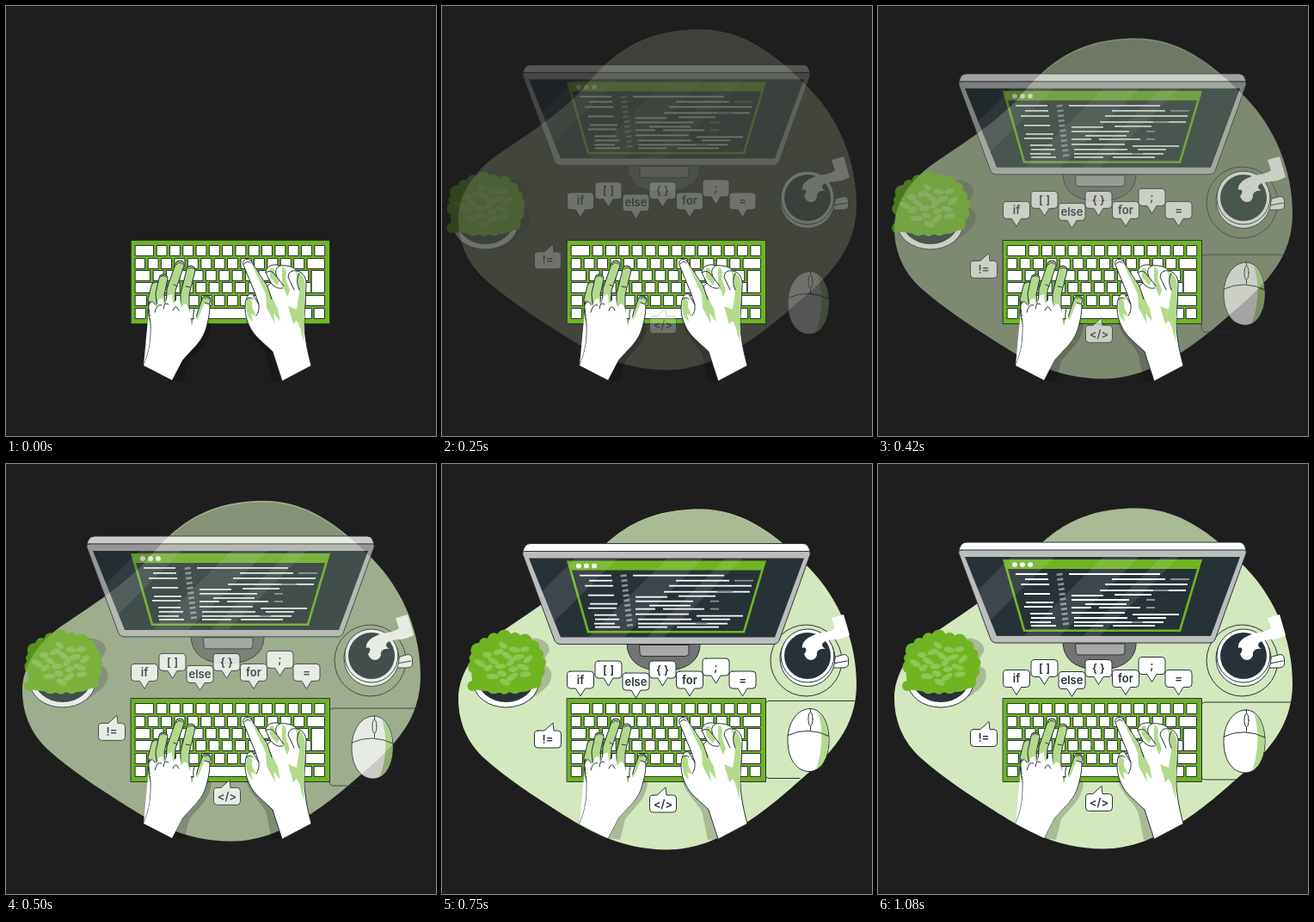
These frames come from a looping animation (500x500 px, 1120 ms). An HTML page:

```html
<!DOCTYPE html>
<html lang="en">
<head>
<meta charset="utf-8">
<title>Coding desk</title>
<style>
  html, body { margin: 0; width: 100%; height: 100%; overflow: hidden; background: #1e1e1e; }
  svg { display: block; width: 100%; height: 100%; }
  text { font: 600 13px Inter, "Open Sans", sans-serif; text-anchor: middle; fill: #263238; }
  .ink { stroke: #263238; stroke-width: 1; stroke-linejoin: round; stroke-linecap: round; }
  .line { fill: none; }
  .white { fill: #fff; }
  .green { fill: #6fb522; }
  .pale { fill: #b3da8b; }
  .shade { fill: #000; opacity: .2; }
  .finger { fill: none; stroke-linecap: round; stroke-linejoin: round; }
</style>
</head>
<body>
<svg viewBox="0 0 500 500">
  <defs>
    <path id="blobShape" d="M19 272C19 245 36 218 62 199C95 176 130 155 160 125C190 90 222 51.500 300 51.500C348 51.500 386 78 427 120C462 156 482 205 482 255C482 306 452 336 416 367C382 397 325 447.500 262 447.500C205 447.500 165 422 135 403C105 384 75 364 50 342C28 322 19 297 19 272Z"/>
    <clipPath id="blobClip"><use href="#blobShape"/></clipPath>
    <clipPath id="screenClip"><path d="M101 108H421L387 200H138Z"/></clipPath>
  </defs>

  <g id="blob"><use href="#blobShape" fill="#d3e8bd"/></g>

  <g id="plant">
    <path class="shade" d="M98 203C112 201 125 207 123 218C119 226 114 230 117 234C128 237 128 250 121 258C114 266 107 269 100 276Z"/>
    <ellipse class="white ink" cx="73" cy="254" rx="38" ry="29"/>
    <ellipse cx="73" cy="250" rx="33" ry="27" fill="#263238"/>
    <g id="foliage"></g>
  </g>

  <g id="mouse">
    <path class="ink line" d="M480 277H381Q376 277 376 282V362Q376 367 381 367H416"/>
    <path class="white ink" d="M428 286C442 286 450 303 450 323C450 344 440 359 427 359C412 359 402 344 402 323C402 302 413 286 428 286Z"/>
    <path class="pale" d="M437 290C446 297 449.500 310 449.500 323C449.500 339 443 352 435 356C442 338 444 310 437 290Z"/>
    <path class="ink line" d="M402 317Q426 306 450 318M428.500 286V311"/>
    <ellipse class="white ink" cx="428.500" cy="298" rx="2.500" ry="8"/>
  </g>

  <g id="mug">
    <circle class="ink line" cx="423.500" cy="228.500" r="41.500"/>
    <path class="white ink" d="M452 226L465 222Q472 220 472.500 227V233Q472 237 465 237H450Z"/>
    <path class="ink line" d="M455 232L471 229"/>
    <ellipse class="white ink" cx="425" cy="226" rx="32" ry="32.500"/>
    <circle class="white ink" cx="425" cy="223" r="31"/>
    <circle cx="425" cy="223" r="27" fill="#263238"/>
    <path class="white" d="M467 175C462 176 458 178 453 179L457 191C450 197 438 195 430 200C423 203 418 208 419 214C424 212 425 217 421 221C424 230 434 230 436 222C435 217 440 214 446 215C439 211 442 207 449 205C459 204 467 203 474 199Z"/>
  </g>

  <g id="monitor">
    <path class="shade" clip-path="url(#blobClip)" d="M120 40H460V98H120Z"/>
    <path d="M215 206H300C301 228 283 239 257 239C232 239 215 229 215 206Z" fill="#737373" class="ink"/>
    <path d="M230 209H287V218Q287 222 283 222H234Q230 222 230 218Z" fill="#a8a8a8" class="ink"/>
    <path class="white ink" d="M94 102Q95 91 103 91H420Q427 91 428 102Z"/>
    <path d="M97 100H425Q429 100 428 104L392 204Q390 208 386 208H137Q133 208 131 204L94 104Q93 100 97 100Z" fill="#bdbdbd" class="ink"/>
    <path d="M101 108H421L387 200H138Z" fill="#263238"/>
    <path class="green" d="M145 111H377L352 195H169Z"/>
    <path d="M151 122H371L350 192.500H171Z" fill="#263238"/>
    <g class="white">
      <ellipse cx="159" cy="117" rx="3" ry="2.800"/>
      <ellipse cx="168" cy="117" rx="3" ry="2.800"/>
      <ellipse cx="177" cy="117" rx="3" ry="2.800"/>
    </g>
    <path fill="none" stroke="#fff" stroke-width="1.800" d="M160 128H197M171 134H198M166 140H199M170 151H200M172 161H204M170 166H203M177 174H203M178 179H206M177 184H201M178 188H207M222 128H328M272 134H334M264 140H360M258 147H358M225 153H262M275 152H318M225 158H292M241 163H289M225 167H248M257 167H305M225 173H287M296 175H350M228 179H290M302 179H335M228 184H332M228 188H262M273 188H322"/>
    <path fill="none" stroke="#8b9295" stroke-width="1.800" d="M340 134H362M320 147H338M312 158H322M312 167H322M295 184H308"/>
    <path fill="none" stroke="#8b9295" stroke-width="7" stroke-dasharray="2.600 3.200" d="M211 127L219 190"/>
    <g clip-path="url(#screenClip)" fill="#fff" opacity=".1">
      <path d="M155 108H205L122 190L101 162Z"/>
      <path d="M262 108H304L212 200H170Z"/>
      <path d="M330 108H350L258 200H238Z"/>
    </g>
  </g>

  <g id="keyboard">
    <rect class="green ink" x="145.500" y="272.500" width="231" height="97"/>
  </g>

  <g id="hands">
    <path class="shade" d="M193 435L207 437L213 413C224 399 237 391 239 371L233 365L205 411Z"/>
    <path class="shade" d="M278 366C285 388 300 395 303 407L309 437L321 436L310 402L283 371Z"/>
    <g id="fingers"></g>
    <path class="white ink" d="M160 418C167 402 169 388 168 368C165 357 165 349 167 343M231 345L237 347C237 358 235 368 231 379C226 392 213 402 205 412L193 435"/>
    <path class="white" d="M160 418C167 402 169 388 168.500 368L166.500 350C169 341 173 341 174 351L178 341L182 340L184 349L188 337L193 335L194 347C199 338 203 338 204 351C208 343 212 346 214 358L216 371L220 355L222 364L226 369L232 357C234 364 233 374 230.500 379C226 392 213 402 205 412L193 435Z"/>
    <path class="ink line" d="M166 347Q170 340 173 347M173 356Q176 345 181 348M183 352Q184 343 189 347M194 354Q197 345 201 354M198 301Q201 296 205 300M212 306Q216 302 219 306M180 315Q183 312 186 315M231 340Q235 337 237 341M219 352Q217 359 218 364M195 324L199 326M209 326L214 327"/>
    <path class="white ink" d="M321 436L310 402C300 392 288 384 283 372C278 362 277 350 279 342C281 334 286 333 288 337L294 347L290 335L276 301C274 295 281 292 285 297L304 326L308 322L302 310C302 302 312 299 318 302C326 301 335 303 338 308C345 309 350 316 349 326L347 360C346 380 350 400 355 418Z"/>
    <path class="pale" d="M285 299L304 327L311 342L316 352L319 367L311 357L313 370L303 351L302 335ZM280 341C284 336 287 343 286 350L291 361L285 358L287 367C280 363 278 350 280 341ZM307 305C311 303 314 307 312 311L318 319L315 325L307 315ZM321 304C326 304 327 310 325 317L330 331L327 338L321 323ZM337 309C345 311 348 317 348 328L346 390C343 378 341 370 338 366L334 370L328 349L338 353L341 333Z"/>
    <path class="ink line" d="M304 326L309 341M308 322Q314 330 322 328M302 310Q309 305 314 314M318 302Q311 306 315 315L323 326M338 308Q329 306 328 315L335 330M341 311Q336 319 341 330M277 300Q281 295 284 299M280 341Q284 337 287 341M294 347Q295 355 291 360"/>
  </g>

  <g id="bubbles"></g>
</svg>

<script>
const LOOP = 1120;
const FPS = 24;
const byId = id => document.getElementById(id);

function add(parent, tag, attrs, text) {
  const node = document.createElementNS("http://www.w3.org/2000/svg", tag);
  for (const key in attrs) node.setAttribute(key, attrs[key]);
  if (text) node.textContent = text;
  return parent.appendChild(node);
}

function key(x, y, width, height = 12) {
  add(byId("keyboard"), "rect", { class: "white ink", x: x + .5, y: y + .5, width: width - 1, height });
}

// A run of equal keys between two wider ones.
function keyRow(y, firstWidth, count, lastX) {
  const start = 150 + firstWidth + 3;
  const pitch = (lastX - start) / count;
  key(150, y, firstWidth);
  for (let i = 0; i < count; i++) key(start + i * pitch, y, pitch - 2.8);
  if (lastX < 371) key(lastX, y, 371 - lastX);
}

function buildKeyboard() {
  keyRow(278, 22, 13, 374);
  keyRow(293, 12, 12, 350);
  keyRow(307, 18, 12, 355);
  keyRow(321, 22, 12, 358);
  keyRow(336, 14, 12, 348);
  key(355, 307, 16, 26);
  for (const x of [150, 165, 181, 196, 212, 297, 312, 328, 343, 358]) key(x, 351, 13);
  key(228, 351, 56);
}

function buildFingers() {
  const fingers = [
    "M172 358L170 342L174 326",
    "M181 352L179 335L183 317",
    "M191 352L192 330L202 301",
    "M208 360L208 335L215 307",
    "M224 371L228 356L233 342"
  ];
  for (const d of fingers) {
    add(byId("fingers"), "path", { class: "finger", d, stroke: "#263238", "stroke-width": 11 });
    add(byId("fingers"), "path", { class: "finger", d, stroke: "#b3da8b", "stroke-width": 9 });
  }
}

function buildFoliage() {
  const leaves = byId("foliage");
  add(leaves, "path", { class: "green", d: "M34 224L65 198L107 208L116 235L113 259L92 265L65 266L33 262Z" });
  const edge = 19;
  for (let i = 0; i < edge; i++) {
    const angle = i / edge * 2 * Math.PI;
    add(leaves, "circle", {
      class: "green",
      cx: 74 + 38 * Math.cos(angle),
      cy: 231 + 30 * Math.sin(angle),
      r: 7.5 + 1.3 * Math.sin(i * 2.4)
    });
  }
  add(leaves, "circle", { class: "green", cx: 34, cy: 258, r: 6 });
  for (let i = 0; i < 20; i++) {
    const angle = i * 2.4, radius = Math.sqrt((i + .5) / 20);
    const x = 73 + 32 * radius * Math.cos(angle), y = 231 + 23 * radius * Math.sin(angle);
    add(leaves, "ellipse", {
      cx: x, cy: y, rx: 5.5 + i % 3, ry: 3.3, fill: "#8fc554",
      transform: `rotate(${-40 + i * 37 % 80} ${x} ${y})`
    });
  }
}

function bubble(label, x, y, up) {
  const r = x + 31, b = y + 20;
  const top = up ? `H${up - 10}L${up} ${y - 9}L${up + 1} ${y}` : "";
  const bottom = up ? "" : `H${x + 21}L${x + 15.5} ${b + 9}L${x + 10} ${b}`;
  const parent = byId("bubbles");
  add(parent, "path", {
    class: "white ink",
    d: `M${x + 4} ${y}${top}H${r - 4}Q${r} ${y} ${r} ${y + 4}V${b - 4}Q${r} ${b} ${r - 4} ${b}` +
       `${bottom}H${x + 4}Q${x} ${b} ${x} ${b - 4}V${y + 4}Q${x} ${y} ${x + 4} ${y}Z`
  });
  add(parent, "text", { x: x + 15.5, y: y + 14.5 }, label);
}

function buildBubbles() {
  bubble("if", 145.5, 239.5);
  bubble("[ ]", 178, 227.5);
  bubble("else", 210, 241.5);
  bubble("{ }", 241, 227.5);
  bubble("for", 272.5, 239.5);
  bubble(";", 303, 224.5);
  bubble("=", 334, 239.5);
  bubble("!=", 107.5, 308.5, 129);
  bubble("</>", 241.5, 383.5, 260);
}

const bezier = (a, b, s) => 3 * (1 - s) * (1 - s) * s * a + 3 * (1 - s) * s * s * b + s * s * s;

// cubic-bezier(.36, -.01, .5, 1.38): a slide that overshoots and settles.
function ease(x) {
  if (x <= 0) return 0;
  if (x >= 1) return 1;
  let low = 0, high = 1;
  for (let i = 0; i < 30; i++) {
    const mid = (low + high) / 2;
    if (bezier(.36, .5, mid) < x) low = mid; else high = mid;
  }
  return bezier(-.01, 1.38, low);
}

// The backdrop trails slightly behind the objects on it.
const slides = [
  ["blob", 0, -30, -.02],
  ["monitor", 0, -30],
  ["bubbles", 0, -30],
  ["plant", -30, 0],
  ["mouse", 0, 30],
  ["mug", 0, 0]
].map(([id, dx, dy, lead = .01]) => ({ node: byId(id), dx, dy, lead }));

function draw(ms) {
  const step = Math.floor((Math.floor(ms / 10) + .5) * FPS / 100 + 1e-6);
  for (const { node, dx, dy, lead } of slides) {
    const progress = step < 2 ? 0 : ease(step / FPS + lead);
    node.setAttribute("opacity", Math.min(1, Math.max(0, progress)));
    node.setAttribute("transform", `translate(${dx * (1 - progress)} ${dy * (1 - progress)})`);
  }
}

buildKeyboard();
buildFingers();
buildFoliage();
buildBubbles();

const start = performance.now();
function tick() {
  draw((performance.now() - start) % LOOP);
  requestAnimationFrame(tick);
}
draw(0);
requestAnimationFrame(tick);
</script>
</body>
</html>
```
